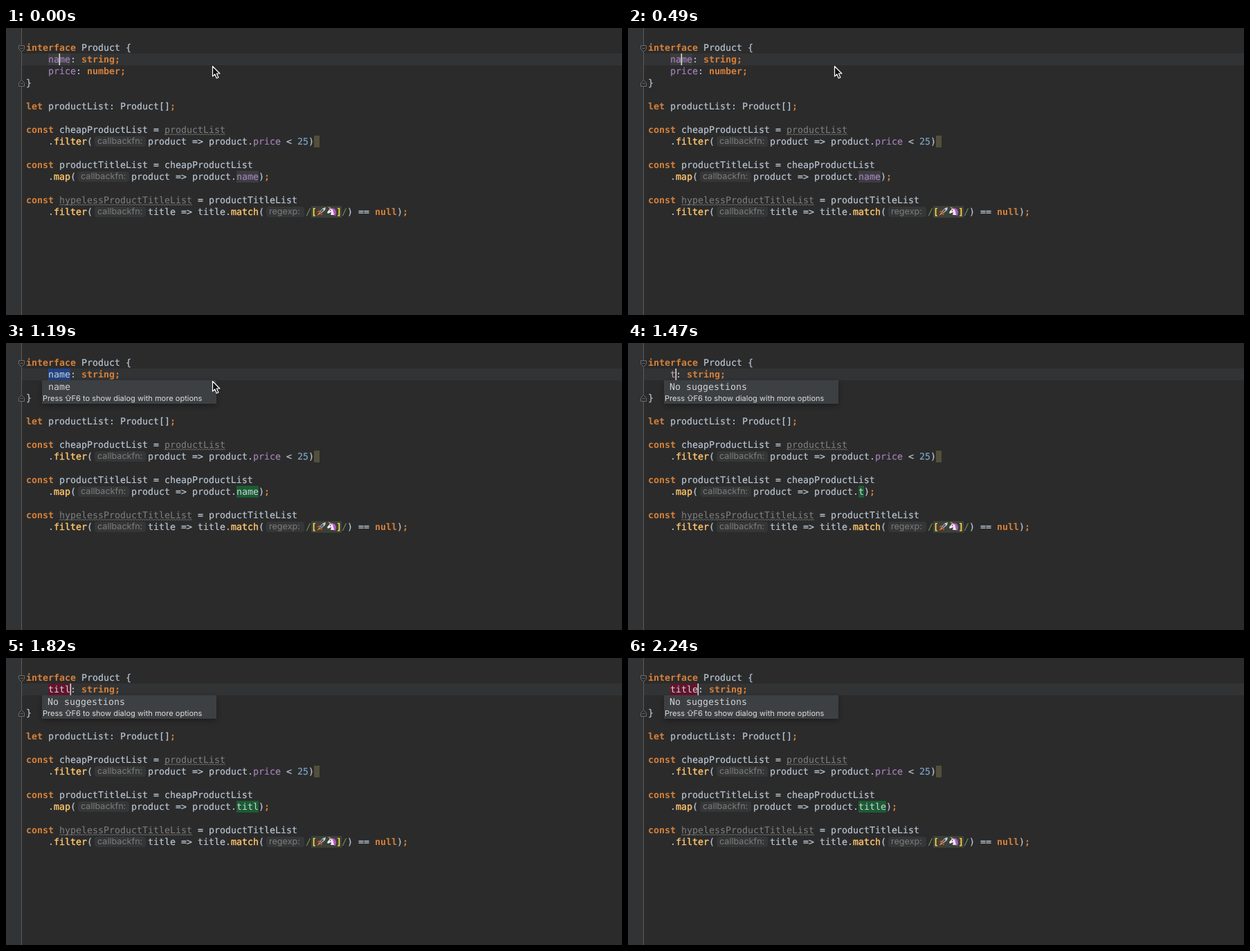
Recreate the animation shown at these times as an HTML page. Size 890 px wide and 416 px high, loop 2310 ms.

```html
<!DOCTYPE html>
<html lang="en">
<head>
<meta charset="utf-8">
<title>Rename refactoring</title>
<style>
  html, body { margin: 0; width: 100%; height: 100%; overflow: hidden; background: #2b2b2b; }
  svg { display: block; width: 890px; height: 416px; }
  text { white-space: pre; text-rendering: geometricPrecision; }
  .code { font: 13.29px "DejaVu Sans Mono", monospace; fill: #b9c5d3; stroke: #b9c5d3; stroke-width: .2; }
  .code .kw { fill: #d5803a; stroke: none; font-weight: bold; }
  .code .fn { fill: #ffc66d; stroke: #ffc66d; stroke-width: .4; }
  .code .prop { fill: #a380b7; stroke: #a380b7; }
  .code .num { fill: #7ba4c6; stroke: #7ba4c6; }
  .code .unused { fill: #808080; stroke: none; }
  .code .re { fill: #6f9160; stroke: none; }
  .code .bracket { fill: #ffd24a; stroke: none; font-weight: bold; }
  .code .lit { fill: #ccd3dc; stroke: none; }
  .code .pink { fill: #d0a0b8; stroke: none; }
  .code .menu { fill: #cfd2d5; stroke: none; }
  .hint { font: 12.6px Inter, sans-serif; fill: #7c7c7c; }
  .tip { font: 11.05px Inter, sans-serif; fill: #dcdcdc; }
</style>
</head>
<body>
<svg viewBox="0 0 890 416">
  <defs>
    <filter id="shadow" x="-10%" y="-40%" width="120%" height="190%">
      <feDropShadow dx="0" dy="3" stdDeviation="4" flood-color="#000" flood-opacity=".35"/>
    </filter>
  </defs>
  <rect width="890" height="416" fill="#2b2b2b"/>
  <rect width="22" height="416" fill="#313335"/>
  <rect x="23" y="37" width="867" height="17" fill="#323334"/>
  <path d="M22.5 0V416" stroke="#5a5c5e"/>
  <g fill="#2b2b2b" stroke="#6a6c6e">
    <path d="M18.5 25.5h8v5l-4 4l-4-4zM20.5 29.5h4"/>
    <path d="M18.5 84.5h8v-5l-4-4l-4 4zM20.5 80.5h4"/>
  </g>
  <g id="still"></g>
  <g id="live"></g>
</svg>
<script>
const CHAR = 8, ROW = 17, LEFT = 29, LOOP = 2310;
const rowTop = row => 20 + ROW * row;
const baseline = row => rowTop(row) + 13;
const escapeText = s => s.replace(/&/g, "&amp;").replace(/</g, "&lt;");

const rect = (x, y, w, h, fill, extra = "") =>
  `<rect x="${x}" y="${y}" width="${w}" height="${h}" fill="${fill}" ${extra}/>`;
const text = (x, y, s, cls) => `<text x="${x}" y="${y}" class="${cls}">${escapeText(s)}</text>`;

// Tokens are written as "class|text", or plain text for the default colour.
function code(row, x, ...tokens) {
  let out = "";
  for (const token of tokens) {
    const [, cls, s] = token.match(/^(?:([a-z]+)\|)?(.*)$/);
    out += text(x, baseline(row), s, cls || "");
    x += CHAR * s.length;
  }
  return `<g class="code">${out}</g>`;
}

const pill = (row, x, w, s) =>
  rect(x, rowTop(row) + 1, w, 15, "#353637", 'rx="4"') + text(x + 4, rowTop(row) + 12, s, "hint");

function wave(row, x, chars) {
  const y = baseline(row) + 3;
  const steps = chars * CHAR / 4;
  return `<path d="M${x} ${y}${"l2 -1.6l2 1.6".repeat(steps)}" fill="none" stroke="#747474" stroke-width=".9"/>`;
}

const rocket = `<g transform="translate(449 260)">
  <path d="M4 6L9 1L13 0L12 4L7 8z" fill="#c9d0d6"/>
  <path d="M5 6L9 2L10 4L7 7z" fill="#4a4f55"/>
  <path d="M4 4L0 7L4 7zM8 8L7 12L5 9z" fill="#d8452f"/>
  <path d="M4 7L0 12L6 9z" fill="#f58a31"/></g>`;
const unicorn = `<g transform="translate(464 259)">
  <path d="M4 3L1 0L6 2z" fill="#dcb56a"/>
  <path d="M5 2Q12 1 13 8L12 13L8 12L6 4z" fill="#b35ac8"/>
  <path d="M4 3L8 4L10 12H5L6 8L1 10L0 8z" fill="#f0e9ef"/>
  <circle cx="4.6" cy="5.6" r=".8" fill="#333"/></g>`;

const still = [
  code(0, LEFT, "kw|interface", " Product {"),
  code(2, 61, "prop|price", ": ", "kw|number;"),
  code(3, LEFT, "}"),
  code(5, LEFT, "kw|let", " productList: Product[]", "kw|;"),
  code(7, LEFT, "kw|const", " cheapProductList = ", "unused|productList"),
  wave(7, 229, 11),
  code(8, 61, ".", "fn|filter", "("),
  pill(8, 128, 74, "callbackfn:"),
  rect(445, rowTop(8), 8, ROW, "#52503a"),
  code(8, 205, "product => product.", "prop|price", " < ", "num|25", ")"),
  code(10, LEFT, "kw|const", " productTitleList = cheapProductList"),
  code(11, 61, ".", "fn|map", "("),
  pill(11, 104, 74, "callbackfn:"),
  code(11, 181, "product => product."),
  code(13, LEFT, "kw|const", " ", "unused|hypelessProductTitleList", " = productTitleList"),
  wave(13, 77, 24),
  code(14, 61, ".", "fn|filter", "("),
  pill(14, 128, 74, "callbackfn:"),
  code(14, 205, "title => title.", "fn|match", "("),
  pill(14, 376, 55, "regexp:"),
  rect(441, rowTop(14), 44, ROW, "#3b4138"),
  code(14, 433, "re|/", "bracket|["),
  rocket, unicorn,
  code(14, 477, "bracket|]", "re|/", ") == ", "kw|null", ")", "kw|;")
];
document.getElementById("still").innerHTML = still.join("");

const idle = {
  word: "name", caret: 2, pointer: true,
  color: "prop", back: "#3b3d3f", use: "prop", useBack: "#3b3d3f"
};
const rename = { ...idle, color: "lit", back: "#214283", use: "lit", useBack: "#1b5c33", menu: "name" };
const typed = (word, color = "lit", back = "#64142c") =>
  ({ ...rename, word, caret: word.length, pointer: false, color, back, menu: "No suggestions" });

const steps = [
  [0, idle],
  [630, rename],
  [1190, { ...rename, caret: -1 }],
  [1400, typed("t", "pink", "none")],
  [1540, typed("ti")],
  [1680, typed("tit")],
  [1750, typed("titl")],
  [1890, typed("title")]
];

function popup(label) {
  const x = label === "name" ? 61 : 60;
  return rect(52, 54, 252, 34, "#3e4143", 'filter="url(#shadow)"') +
    `<g class="code">${text(x, 68, label, "menu")}</g>` +
    text(53, 84, "Press", "tip") +
    '<path d="M90 75.5l4 4h-2v4h-4v-4h-2z" fill="none" stroke="#dcdcdc" stroke-width=".9"/>' +
    text(94.5, 84, "F6 to show dialog with more options", "tip");
}

const pointer = `<path d="M298.5 55.5v14.6l3.3-3.1l2.5 5.8l2.6-1.1l-2.5-5.7h4.5z"
  fill="#111" stroke="#fff" stroke-width="1.2" stroke-linejoin="round"/>`;

function draw(s) {
  const width = s.word.length * CHAR;
  return rect(61, rowTop(1), width, ROW, s.back) +
    code(1, 61, `${s.color}|${s.word}`, ": ", "kw|string;") +
    rect(333, rowTop(11), width, ROW, s.useBack) +
    code(11, 333, `${s.use}|${s.word}`, ")", "kw|;") +
    (s.caret < 0 ? "" : rect(60.5 + s.caret * CHAR, rowTop(1), 1.6, ROW, "#d8d8d8")) +
    (s.menu ? popup(s.menu) : "") +
    (s.pointer ? pointer : "");
}

const live = document.getElementById("live");
const start = performance.now();
let shown = -1;

function tick() {
  const t = Math.max(0, performance.now() - start) % LOOP;
  const now = steps.filter(step => step[0] <= t).length - 1;
  if (now !== shown) {
    live.innerHTML = draw(steps[now][1]);
    shown = now;
  }
  requestAnimationFrame(tick);
}
tick();
</script>
</body>
</html>
```
